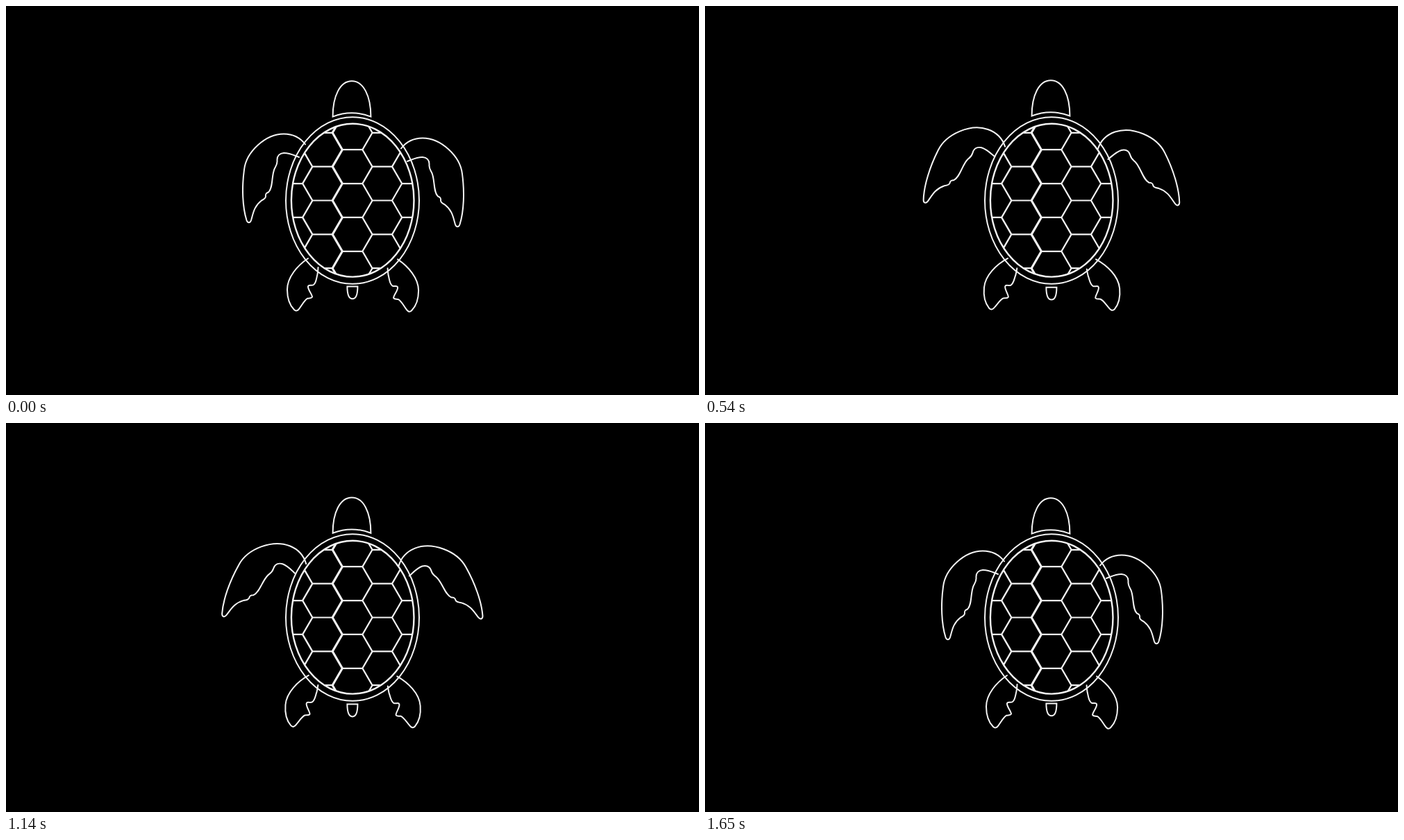
These frames come from a looping animation (998 by 561 pixels, 1800 ms). An HTML page:

```html
<!DOCTYPE html>
<html lang="en">
<head>
<meta charset="utf-8">
<title>Swimming turtle</title>
<style>
  html, body { margin: 0; width: 100%; height: 100%; overflow: hidden; background: #000; }
  svg { display: block; width: 100vw; height: 100vh; fill: none; stroke: #f4f4f4; stroke-width: 2; }
</style>
</head>
<body>
<svg viewBox="0 0 998 561">
  <defs>
    <clipPath id="shellClip"><ellipse cx="499.2" cy="280.2" rx="88.3" ry="110.4"/></clipPath>
    <path id="flipper" stroke-linecap="round" d="M431 199.5C423 189 412 184.5 400 184.5C374 184.5 346 210 343 236
      C339.5 262 340.5 290 346.5 309C348 313.3 351.5 313.5 353 309C356 299 357 289 368 280.5
      C372 278.5 374 277 374 274.5C373.5 271.5 374 270 378 268.5C385 262 382 244 387 234
      C389 230.5 391 228 390.5 223C390 216 394.5 212.5 400 212C408 211.8 414 215 422 218"/>
    <path id="leg" stroke-linecap="round" d="M435 364C420 374 405 391 405 409C405 423 410 433 415 438
      C418 441 421 439 423 435.5C427 430 430 424 434 421.8C437 421 440 422 441 419.5
      C441 416 434.5 409 435 404.5C435.5 401 440 404 443 402C447 399 447 392 448.5 387
      C449 383 449.5 380 449.5 377"/>
  </defs>

  <path id="head" d="M470.6 159.6C470.6 130 481 108.3 498 108.3C515 108.3 525.4 130 525.4 159.6Q498 149 470.6 159.6Z"/>
  <path id="tail" d="M491.4 404.5H506.4C506.4 415 504 422.3 499 422.3C494 422.3 491.4 415 491.4 404.5Z"/>
  <ellipse cx="499" cy="280.5" rx="96" ry="120.3"/>
  <ellipse cx="499.2" cy="280.2" rx="88.3" ry="110.4" stroke-width="2.4"/>
  <path id="scutes" clip-path="url(#shellClip)" stroke-width="2.2"/>

  <use id="flipperLeft" href="#flipper"/>
  <use id="flipperRight" href="#flipper"/>
  <use id="legLeft" href="#leg"/>
  <use id="legRight" href="#leg"/>
</svg>
<script>
const STEP = 30, LOOP = 1800, PEAK = 30, FLIPPER_END = 55, BODY_END = 46;
const el = id => document.getElementById(id);
const move = (id, transform) => el(id).setAttribute('transform', transform);
const mirror = (dx, dy) => `translate(${998 + dx} ${dy}) scale(-1 1) `;

function hexagon(cx, cy) {
  const side = 28.4, half = 24.43;
  return `M${cx - side} ${cy}l${side / 2} ${-half}h${side}l${side / 2} ${half}` +
    `l${-side / 2} ${half}h${-side}Z`;
}

// The left columns sit slightly apart from the middle one, which doubles their shared edges.
let cells = '';
[413, 455.4, 499.1, 541.8, 584.4].forEach((x, column) => {
  for (let row = -3; row <= 3; row++) {
    cells += hexagon(x, 280.5 + 48.86 * (row + (column % 2) / 2));
  }
});
el('scutes').setAttribute('d', cells);

// Linear rise to 1 at PEAK, then linear fall to 0 at the end step.
const stroke = (step, end) =>
  step < PEAK ? step / PEAK : Math.max(0, (end - step) / (end - PEAK));

function draw(time) {
  const step = Math.min(FLIPPER_END, Math.floor((time % LOOP) / STEP));
  const swing = stroke(step, FLIPPER_END);
  const body = stroke(step, BODY_END);

  const flipper = `translate(422 204) rotate(${32 * swing}) ` +
    `scale(${1 + 0.024 * swing}) translate(-422 -204)`;
  move('flipperLeft', flipper);
  move('flipperRight', mirror(2 - 3.5 * swing, 6 - 4 * swing) + flipper);

  const leg = `translate(0 ${body}) rotate(${9 * body} 442 375)`;
  move('legLeft', leg);
  move('legRight', mirror(1.1, 1.3) + leg);

  move('head', `translate(0 ${-1.8 * body})`);
  move('tail', `translate(0 ${2.2 * body})`);
}

let start;
function tick(now) {
  start ??= now;
  draw(now - start);
  requestAnimationFrame(tick);
}
draw(0);
requestAnimationFrame(tick);
</script>
</body>
</html>
```
